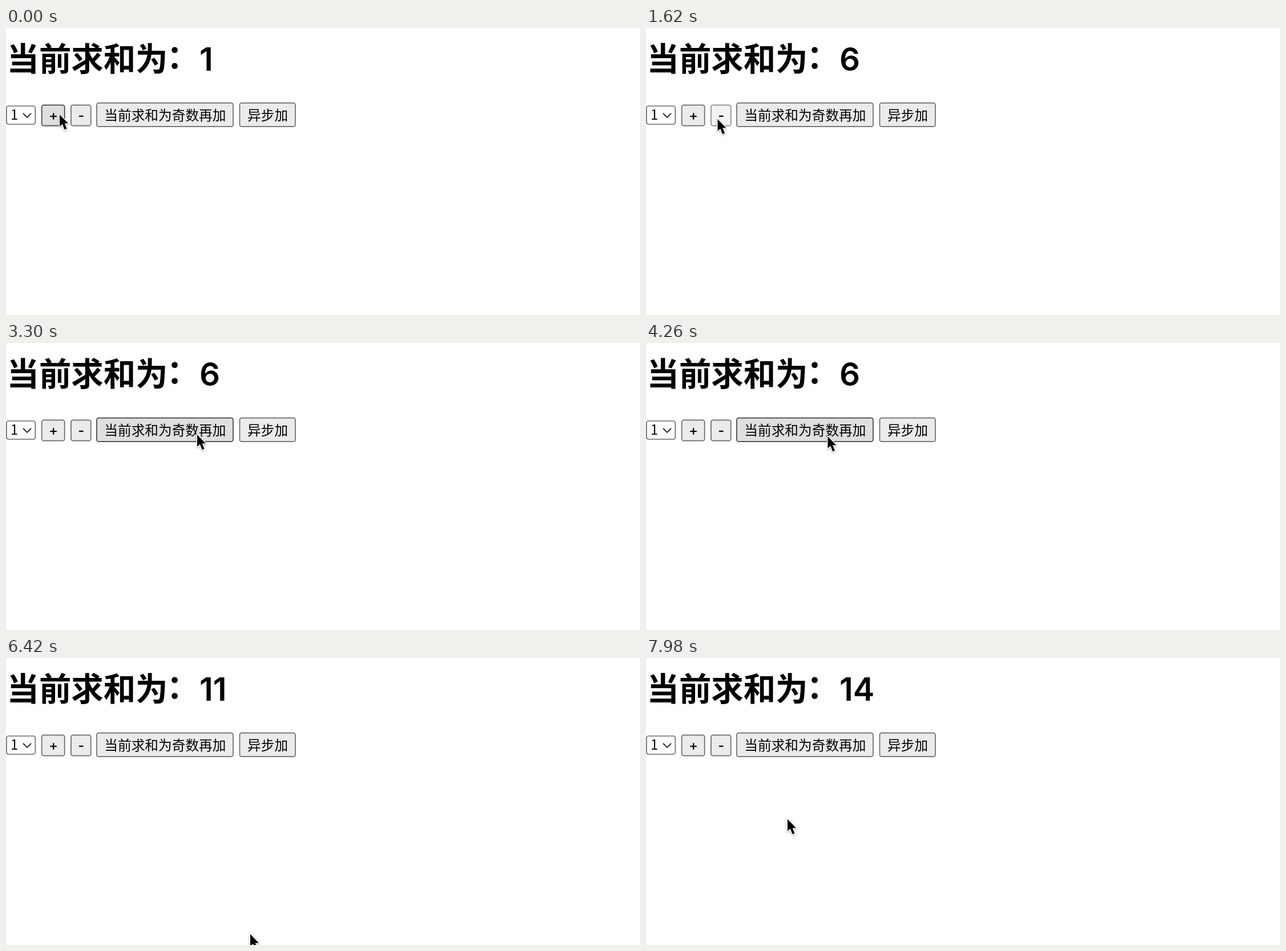
An HTML page that plays this animation: 1111x504 px, repeating every 8000 ms.

```html
<!DOCTYPE html>
<html lang="zh-CN">
<head>
<meta charset="utf-8">
<style>
html, body { margin: 0; width: 100%; height: 100%; overflow: hidden; background: #fff; }
svg { display: block; font: 500 23.7px Inter, "Noto Sans CJK SC", "Noto Sans CJK", sans-serif; }
.title { font-size: 56.4px; font-weight: 700; }
#count { font-weight: 600; }
.option { font-family: "Noto Sans CJK SC", "Noto Sans CJK", sans-serif; }
.button rect { fill: #ebebeb; stroke: #6b6b6b; stroke-width: 1.7; }
.button.hover rect { fill: #dfdfdf; stroke: #444; }
.button.active rect { fill: #f3f3f3; stroke: #8d8d8d; }
#cursor { filter: drop-shadow(0 1.5px 1.5px rgba(0, 0, 0, .35)); }
</style>
</head>
<body>
<svg width="1111" height="504" viewBox="0 0 1111 504">
  <text class="title" x="1.5" y="75">当前求和为<tspan dx="-2" dy="-4">：</tspan></text>
  <text class="title" id="count" x="339" y="74.5">1</text>
  <rect x=".9" y="137" width="50.4" height="32" rx="3.5" fill="#fff" stroke="#6b6b6b" stroke-width="1.7"/>
  <text class="option" x="8" y="161">1</text>
  <path d="M30 150l7 7 7-7" fill="none" stroke="#222" stroke-width="1.8"/>
  <g id="buttons"></g>
  <path id="cursor" d="M0 0V21L4.8 16.8 8.6 26.5 12.6 24.8 8.7 15.5H15Z"
    stroke="#fff" stroke-width="3" stroke-linejoin="round" paint-order="stroke"/>
</svg>
<script>
const LOOP = 8000, STEP = 60, HOLD = 60, ASYNC_DELAY = 500;
const START = [94, 152];

// Pointer moves: start, end, and the point reached.
const moves = [
  [1000, 1200, 125.5, 160], [1800, 2000, 392, 164], [2120, 2280, 82, 165],
  [2440, 2820, 335, 161], [3480, 3660, 440, 165], [3720, 4020, 435, 221],
  [4020, 4260, 318.5, 164], [4560, 4800, 299, 230], [4860, 5220, 469, 155],
  [6160, 6420, 428, 485], [6540, 6600, 428, 520], [6900, 7260, 320, 160],
  [7380, 7680, 307, 398], [7740, 7980, 248, 283]
];

// Bursts of clicks: first press, how many, time between them.
const presses = [
  [180, 5, 165], [1620, 2, 120], [2040, 1, 0], [2340, 1, 0], [3180, 1, 0],
  [3360, 1, 0], [4320, 2, 120], [5260, 7, 140], [7320, 1, 0]
].flatMap(([first, n, gap]) => Array.from({ length: n }, (_, i) => first + i * gap));

const changes = [];
const add = (time, amount) => changes.push({ time, amount });
const sumAt = t => changes.reduce((sum, c) => c.time <= t ? sum + c.amount : sum, 1);

function makeButton(label, x, y, w, h, click) {
  const group = document.createElementNS('http://www.w3.org/2000/svg', 'g');
  group.innerHTML = `<rect x="${x}" y="${y}" width="${w}" height="${h}" rx="3.5"/>
    <text x="${x + w / 2 + .4}" y="161.5" text-anchor="middle">${label}</text>`;
  document.getElementById('buttons').append(group);
  const contains = ([px, py]) => px > x && px < x + w && py > y && py < y + h;
  return { group, contains, click };
}

const buttons = [
  makeButton('+', 62.7, 135.3, 40, 36.4, t => add(t, 1)),
  makeButton('-', 113.9, 135.3, 34.8, 36.4, t => add(t, -1)),
  makeButton('当前求和为奇数再加', 159, 131.6, 239, 41.6, t => sumAt(t) % 2 && add(t, 1)),
  makeButton('异步加', 409.5, 131.6, 97.5, 41.6, t => add(t + ASYNC_DELAY, 1))
];

function pointerAt(t) {
  let [x, y] = START;
  for (const [start, end, toX, toY] of moves) {
    const u = Math.min(1, Math.max(0, (t - start) / (end - start)));
    const eased = u * u * (3 - 2 * u);
    x += (toX - x) * eased;
    y += (toY - y) * eased;
  }
  return [x, y];
}

// A click takes effect on release, on the button below the pointer.
for (const press of presses) {
  buttons.find(b => b.contains(pointerAt(press)))?.click(press + HOLD);
}

const count = document.getElementById('count');
const cursor = document.getElementById('cursor');

function draw(now) {
  const t = Math.floor(now % LOOP / STEP) * STEP;
  const pointer = pointerAt(t);
  const pressed = presses.some(press => t >= press && t < press + HOLD);
  count.textContent = sumAt(t);
  cursor.setAttribute('transform', `translate(${pointer})`);
  for (const { group, contains } of buttons) {
    const state = contains(pointer) ? (pressed ? 'active' : 'hover') : '';
    group.setAttribute('class', `button ${state}`);
  }
  requestAnimationFrame(draw);
}
requestAnimationFrame(draw);
</script>
</body>
</html>
```
